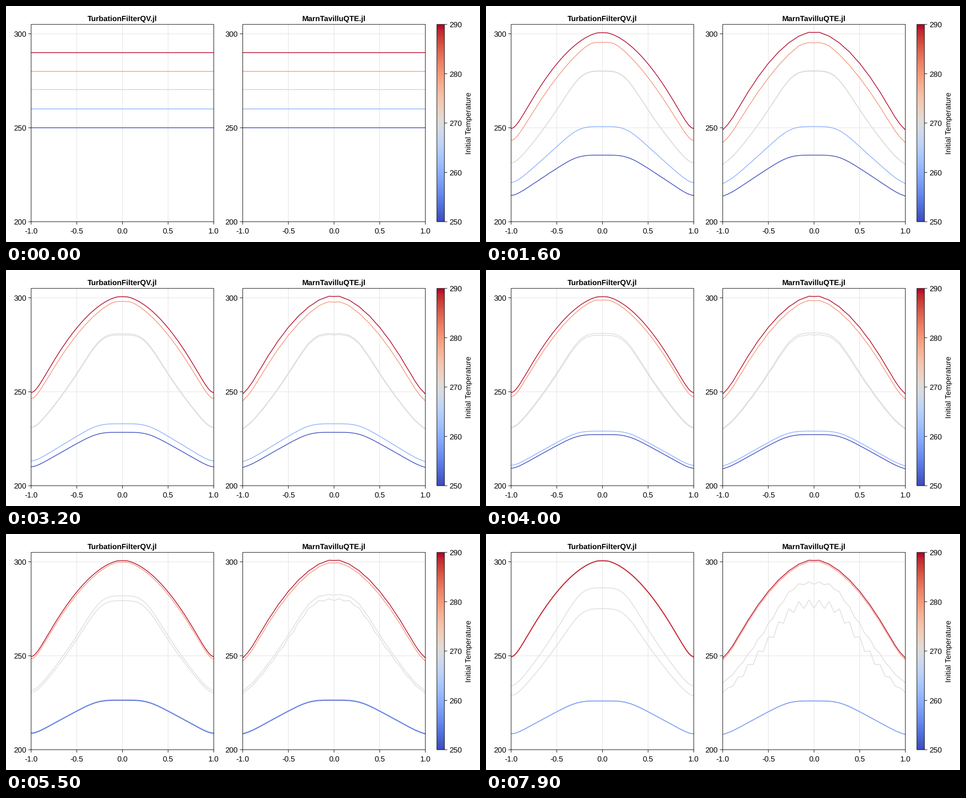
These frames come from a looping animation (1000 by 500 pixels, 8 s). A matplotlib script:

```python
import numpy as np
import matplotlib.pyplot as plt
from matplotlib.animation import FuncAnimation

W, H, DPI = 1000, 500, 100
FRAMES, STEP = 80, 100
PX = 72 / DPI
TOP, BOTTOM = 39, 457
PANELS = [(53, 438.3, "TurbationFilterQV.jl"),
          (499.4, 884.7, "MarnTavilluQTE.jl")]

plt.rcParams["font.family"] = "Liberation Sans"
plt.rcParams["text.hinting"] = "none"
fig = plt.figure(figsize=(W / DPI, H / DPI), dpi=DPI, facecolor="white")
ax = fig.add_axes([0, 0, 1, 1])
ax.axis("off")
cmap = plt.get_cmap("coolwarm")


def y_px(temp):
    return BOTTOM - (temp - 200) / 105 * (BOTTOM - TOP)


def segment(x0, y0, x1, y1, color="black", z=5):
    ax.plot([x0, x1], [y0, y1], color=color, lw=PX, zorder=z, snap=False,
            solid_capstyle="butt")


def frame_box(x0, x1):
    ax.add_patch(plt.Rectangle((x0, TOP), x1 - x0, BOTTOM - TOP, fill=False,
                               ec="black", lw=PX, zorder=6, snap=False))


def label(x, y, s, ha="center", **kw):
    ax.text(x, y, s, ha=ha, va="baseline", fontsize=16 * PX, **kw)


def draw_panel(x0, x1, title):
    for v in np.linspace(-1, 1, 5):
        x = x0 + (v + 1) / 2 * (x1 - x0)
        if abs(v) < 1:
            segment(x, TOP, x, BOTTOM, "#e0e0e0", 1)
        segment(x, BOTTOM, x, BOTTOM + 6)
        label(x, 482, f"{v:.1f}")
    for v in (200, 250, 300):
        y = y_px(v)
        if v > 200:
            segment(x0, y, x1, y, "#e0e0e0", 1)
        segment(x0 - 6, y, x0, y)
        label(x0 - 10, y + 6, str(v), "right")
    frame_box(x0, x1)
    label((x0 + x1) / 2, 32, title, weight="bold")


def draw_colorbar():
    ax.imshow(np.linspace(1, 0, 256)[:, None], cmap=cmap, aspect="auto",
              extent=(909, 925, BOTTOM, TOP), vmin=0, vmax=1)
    frame_box(909, 925)
    for v in range(250, 291, 10):
        y = BOTTOM - (v - 250) / 40 * (BOTTOM - TOP)
        segment(925, y, 931, y)
        label(935, y + 6, str(v), "left")
    ax.text(977, 248, "Initial Temperature", rotation=90, ha="center",
            va="center", fontsize=16 * PX)


def fade(t, rate):
    return np.exp(-rate * t)


def drop(t, rate, middle):
    """Logistic fall from 1 to 0."""
    return 1 / (1 + np.exp(rate * (t - middle)))


def split(t):
    """Half the growing gap between the two unstable curves."""
    return 0.045 * np.exp(0.61 * t)


LAT = np.linspace(0, 1, 501)


def profile(x, cap, tilt):
    """1 at the equator, 0 at the poles: flat over the cap, then a slope
    that follows a power of latitude and levels off at the pole."""
    mid = (LAT[1:] + LAT[:-1]) / 2
    slope = (1 - np.exp(-(mid / cap) ** 3)) * mid ** tilt * (1 - mid ** 16)
    fall = np.concatenate([[0], np.cumsum(slope)])
    return 1 - np.interp(np.abs(x), LAT, fall / fall[-1])


class Curve:
    """Slow drift of pole, equator and shape after a quick relaxation."""

    def __init__(self, start, pole, equator, shape, shift=None, jitter=None):
        self.start = start
        self.color = cmap((start - 250) / 40)
        self.pole, self.equator, self.shape = pole, equator, shape
        self.shift = shift or (lambda t: 0)
        self.jitter = jitter or (lambda t: 0)

    def slow(self, x, t, coarse):
        pole, equator = self.pole(t), self.equator(t)
        temp = pole + (equator - pole) * profile(x, *self.shape(t))
        if coarse:
            zigzag = np.where(np.arange(len(x)) % 2, 1, -1) * (1 - x ** 4)
            temp += self.shift(t) + self.jitter(t) * zigzag
            temp[[0, -1]] -= 0.02 * (equator - pole)
        return temp

    def at(self, x, t, coarse):
        offset = self.start - self.slow(x, 0, coarse)
        return self.slow(x, t, coarse) + offset * fade(t, 4.5)


def unstable(sign, jitter):
    return Curve(270.35 + sign * 0.045,
                 lambda t: 230.9 + 2.2 * fade(t, 1)
                 + split(t) * (0.1 + 0.47 * sign),
                 lambda t: 280.6 - 2.2 * fade(t, 1) + sign * split(t),
                 lambda t: (0.29, -0.4),
                 lambda t: 0.45 * split(t),
                 lambda t: jitter * split(t))


CURVES = [
    Curve(250,
          lambda t: 208.4 + 18.6 * fade(t, 0.75),
          lambda t: 225.9 + 36 * fade(t, 0.83),
          lambda t: (0.3, 0.1)),
    Curve(260,
          lambda t: 208.4 + 20.8 * drop(t, 1, 2),
          lambda t: 226 + 47.4 * drop(t, 1.15, 1.67),
          lambda t: (0.3, 0.1 - 0.35 * drop(t, 1.15, 1.67))),
    unstable(-1, 0.4),
    unstable(1, 0.12),
    Curve(280,
          lambda t: 249.6 - 12.6 * fade(t, 0.43),
          lambda t: 300.7 - 10.5 * fade(t, 0.43),
          lambda t: (0.05 + 0.15 * fade(t, 0.43), 0.75 - 0.5 * fade(t, 0.43)),
          lambda t: -0.3 * (1 - fade(t, 0.5)),
          lambda t: 0.12 * (1 - fade(t, 1))),
    Curve(290,
          lambda t: 249.6,
          lambda t: 300.6,
          lambda t: (0.05, 0.75),
          lambda t: 0.25,
          lambda t: 0.12 * (1 - fade(t, 1))),
]

GRIDS = [np.linspace(-1, 1, 241), np.linspace(-1, 1, 37)]

for panel in PANELS:
    draw_panel(*panel)
draw_colorbar()
ax.set_xlim(0, W)
ax.set_ylim(H, 0)

lines = []
for side, (x0, x1, _) in enumerate(PANELS):
    xs = x0 + (GRIDS[side] + 1) / 2 * (x1 - x0)
    for c in CURVES:
        line, = ax.plot(xs, xs, color=c.color, lw=1.5 * PX, zorder=3,
                        snap=False, solid_capstyle="butt",
                        solid_joinstyle="miter")
        lines.append((line, c, side))


def update(frame):
    t = frame * STEP / 1000
    for line, c, side in lines:
        line.set_ydata(y_px(c.at(GRIDS[side], t, side == 1)))
    return [line for line, _, _ in lines]


anim = FuncAnimation(fig, update, frames=FRAMES, interval=STEP,
                     init_func=lambda: update(0), repeat=True, repeat_delay=0,
                     blit=False)
plt.show()
```
